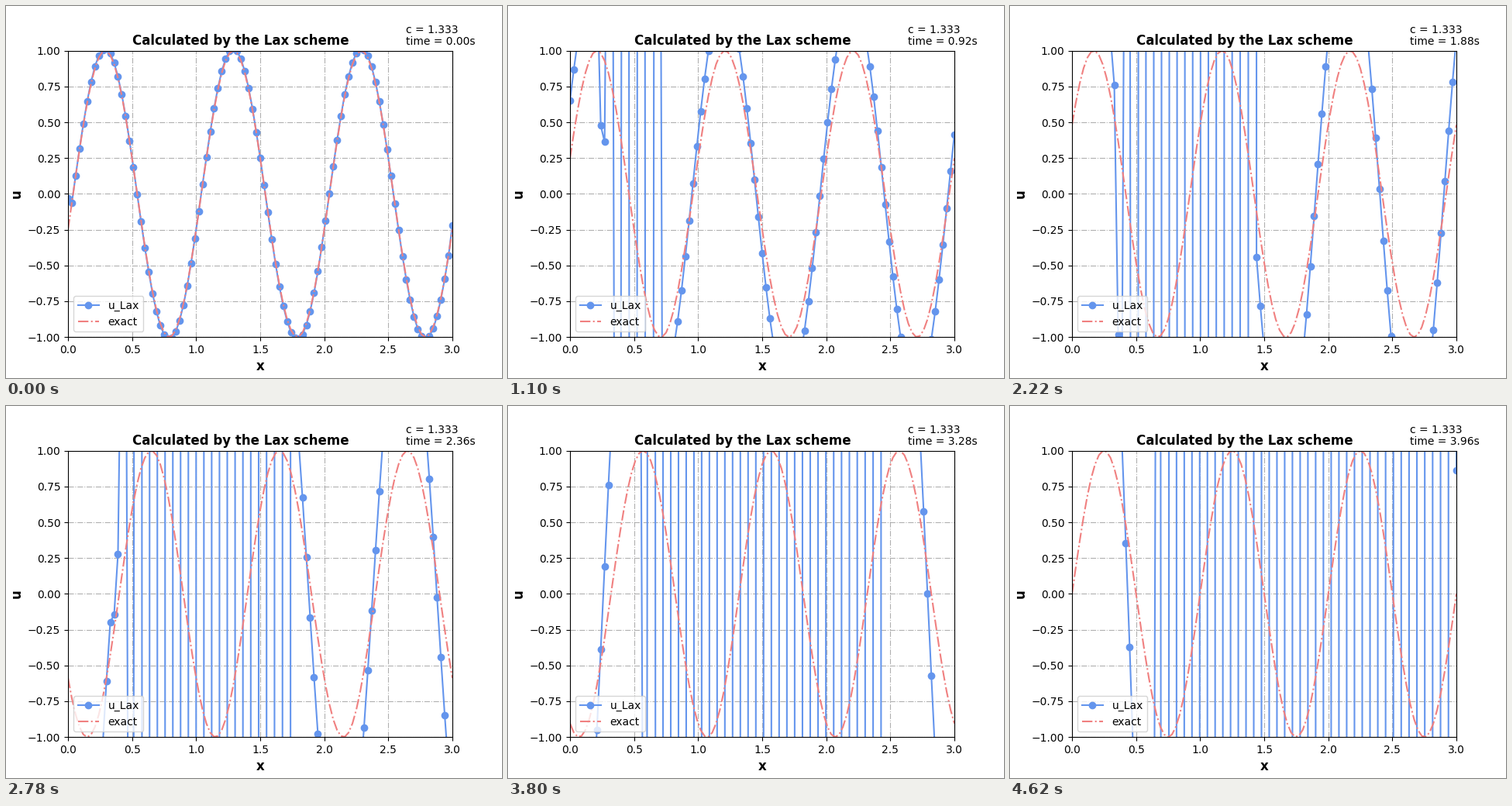
A matplotlib script that plays this animation: 640 by 480 pixels, repeating every 4640 ms.

```python
import numpy as np
import matplotlib.pyplot as plt
from matplotlib.animation import FuncAnimation

DX, DT, STEPS = 0.03, 0.04, 100
C = DT / DX
TICK = 20                          # ms
PACE = (0, 1, 1, 1, 1, 1, 2)       # the middle step of each three is held for five ticks

x = np.linspace(0, 3, 101)


def wave(t):
    return np.sin(2 * np.pi * (x - t))


def lax(u):
    """One step of the Lax scheme with wrapped ends."""
    right, left = np.roll(u, -1), np.roll(u, 1)
    return (right + left) / 2 - C / 2 * (right - left)


states = [lax(wave(0))]
while len(states) < STEPS:
    states.append(lax(states[-1]))

plt.rcParams["font.family"] = "DejaVu Sans"
fig, ax = plt.subplots(figsize=(6.4, 4.8), dpi=100)
bold = dict(fontsize=12, fontweight="bold")

ax.set_xlim(0, 3)
ax.set_ylim(-1, 1)
ax.grid(linestyle="-.")
ax.set_xlabel("x", **bold)
ax.set_ylabel("u", **bold)
ax.text(0.5, 1.04, "Calculated by the Lax scheme", **bold)
ax.text(2.64, 1.12, f"c = {C:.3f}")
clock = ax.text(2.64, 1.04, "")

lax_line, = ax.plot(x, states[0], color="cornflowerblue", marker="o", label="u_Lax")
exact_line, = ax.plot(x, wave(DT), color="lightcoral", linestyle="-.", label="exact")
ax.legend(loc="lower left")


def draw(tick):
    group, beat = divmod(tick, len(PACE))
    step = 3 * group + PACE[beat]
    lax_line.set_ydata(states[step])
    exact_line.set_ydata(wave((step + 1) * DT))
    clock.set_text(f"time = {step * DT:.2f}s")
    return lax_line, exact_line, clock


anim = FuncAnimation(fig, draw, frames=232, interval=TICK, repeat=True, repeat_delay=0)
plt.show()
```
